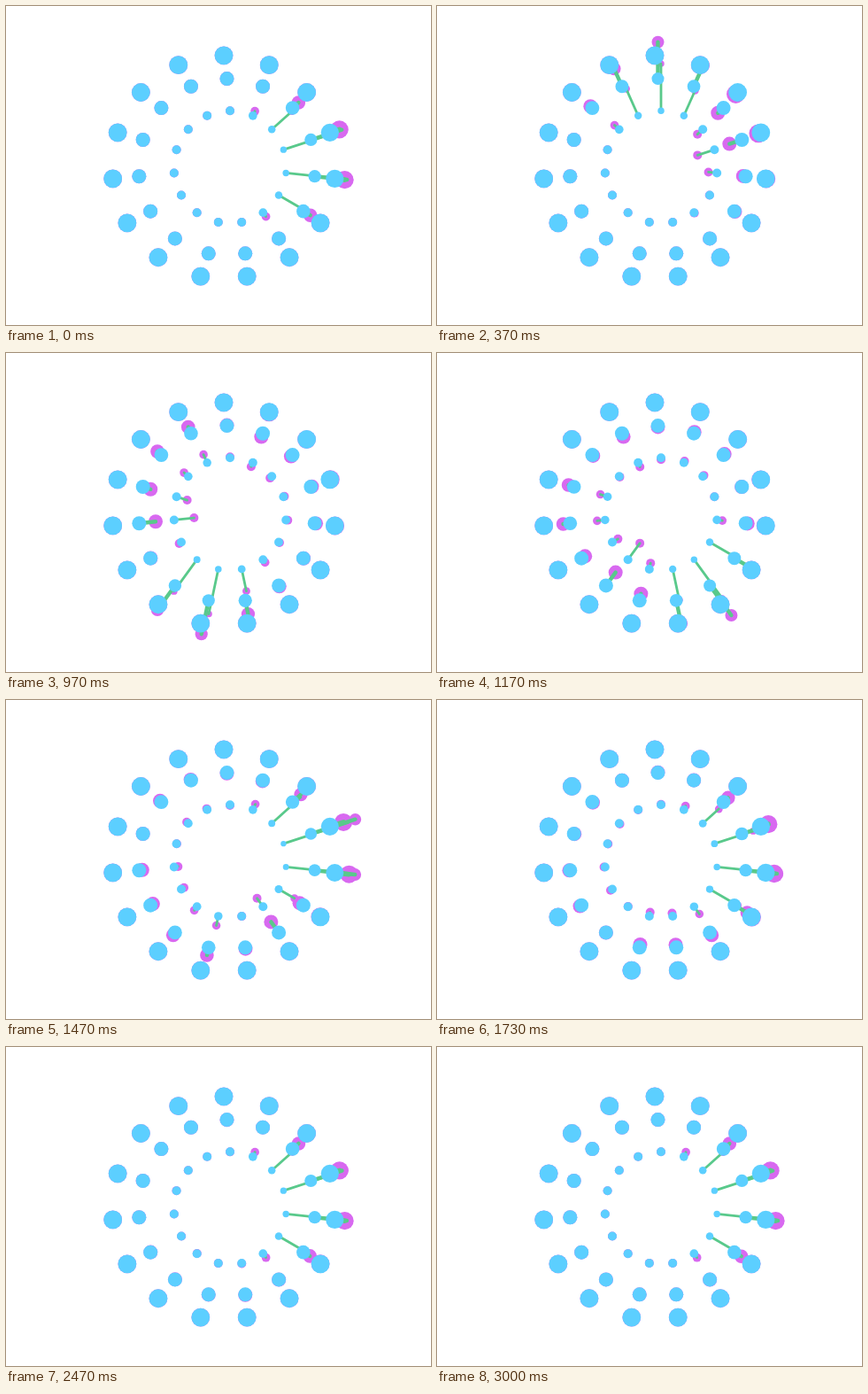
An HTML page with a canvas for the animation above (3030 ms loop, 480 px wide and 360 px high).

```html
<!DOCTYPE html>
<html lang="en">
<head>
<meta charset="utf-8">
<title>Spring dots</title>
<style>
  html, body { margin: 0; width: 100%; height: 100%; overflow: hidden; background: #fff; }
  canvas { display: block; }
</style>
</head>
<body>
<canvas id="stage" width="480" height="360"></canvas>
<script>
const ctx = document.getElementById('stage').getContext('2d');
const LOOP = 3030, STEP = 100 / 3, STEPS = 91, SPOKES = 15;
const TURN_STEPS = 40, REST_ANGLE = 6, CY = 181.8;
const BLUE = '#5ccfff', PINK = '#d869f0', GREEN = '#59c98b';

// Push strength and angular reach: at rest, and while the pusher circles.
const rings = [
  { cx: 253, radius: 63.5, size: 5, line: 2.8, rest: [58, 75], moving: [42, 60] },
  { cx: 249.5, radius: 99.7, size: 8, line: 4.4, rest: [42, 52], moving: [33, 52] },
  { cx: 246, radius: 126, size: 10.4, line: 5.5, rest: [15, 36], moving: [0, 36] }
];

const rad = deg => deg * Math.PI / 180;
const mix = (a, b, k) => a + (b - a) * k;
const clamp01 = x => Math.max(0, Math.min(1, x));

const dots = rings.flatMap(ring => Array.from({ length: SPOKES }, (_, i) => {
  const angle = 90 - i * 360 / SPOKES;
  const dx = Math.cos(rad(angle)), dy = -Math.sin(rad(angle));
  return { ring, angle, dx, dy, x: ring.cx + dx * ring.radius, y: CY + dy * ring.radius };
}));

function push(dot, step) {
  const pusher = REST_ANGLE + 360 * Math.min(step, TURN_STEPS) / TURN_STEPS;
  const moving = Math.min(clamp01(step / 7), clamp01((TURN_STEPS - step) / 4));
  const [strength, reach] = dot.ring.rest.map((v, i) => mix(v, dot.ring.moving[i], moving));
  const turn = (pusher - dot.angle + 720) % 360;
  const gap = Math.min(turn, 360 - turn);
  return gap < reach ? strength * Math.cos(Math.PI / 2 * gap / reach) ** 2 : 0;
}

// Damped spring along the spoke, starting settled.
function springPath(dot) {
  let shift = push(dot, 0), speed = 0;
  const path = [shift];
  for (let n = 1; n < STEPS; n++) {
    speed = 0.8 * speed + 0.2 * (push(dot, n) - shift);
    shift += speed;
    path.push(shift);
  }
  return path;
}
dots.forEach(dot => { dot.path = springPath(dot); });

function disc(x, y, r, color) {
  ctx.fillStyle = color;
  ctx.beginPath();
  ctx.arc(x, y, r, 0, 2 * Math.PI);
  ctx.fill();
}

function draw(time) {
  const n = Math.min(STEPS - 1, Math.floor((time % LOOP + 4) / STEP));
  const pose = dots.map(dot => {
    const shift = dot.path[n];
    return {
      ...dot,
      shift,
      px: dot.x + dot.dx * shift,
      py: dot.y + dot.dy * shift,
      r: dot.ring.size - 0.024 * Math.max(0, shift)
    };
  });
  ctx.fillStyle = '#fff';
  ctx.fillRect(0, 0, 480, 360);
  pose.forEach(d => disc(d.px, d.py, d.r, PINK));
  ctx.strokeStyle = GREEN;
  ctx.lineCap = 'round';
  pose.forEach(d => {
    if (Math.abs(d.shift) < 1) return;
    ctx.lineWidth = d.ring.line;
    ctx.beginPath();
    ctx.moveTo(d.x, d.y);
    ctx.lineTo(d.px, d.py);
    ctx.stroke();
  });
  pose.forEach(d => disc(d.x, d.y, d.r, BLUE));
}

const start = performance.now();
function tick() {
  draw(performance.now() - start);
  requestAnimationFrame(tick);
}
tick();
</script>
</body>
</html>
```
